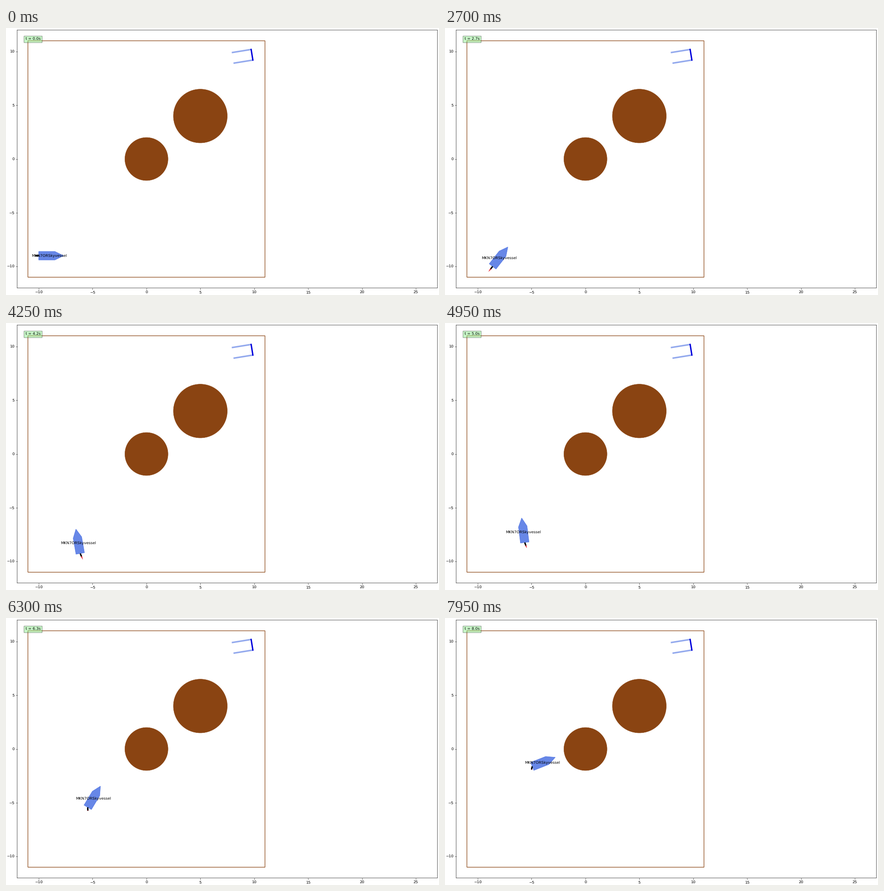
Write a matplotlib script that moves like this. It is 952 px wide and 588 px high and loops after 8 s.

```python
import numpy as np
import matplotlib.pyplot as plt
from matplotlib.animation import FuncAnimation
from matplotlib.patches import Circle, Polygon, Rectangle

W, H, DPI = 952, 588, 60
FRAMES, STEP = 160, 50
LABEL = "MKN7ORSkyvessel"
BROWN = "#8a4412"

# Flight plan: time, x, y, heading, nozzle angle (degrees)
PLAN = np.array([
    [0.00, -9.00, -9.00, 0, 0],
    [1.55, -8.80, -9.06, 9, -36],
    [2.70, -8.00, -9.21, 52, 0],
    [4.25, -6.32, -8.27, 100, 13],
    [5.70, -5.29, -5.83, 79, 20],
    [6.85, -4.62, -3.41, 42, 46],
    [7.95, -4.01, -1.25, 21.5, 56],
])


def spline(t, p):
    """Cubic spline through p(t): starts at rest, ends without acceleration."""
    h = np.diff(t)
    slope = np.diff(p, axis=0) / h[:, None]
    n = len(t)
    system, rhs = np.eye(n), np.zeros_like(p)
    for k in range(1, n - 1):
        system[k, k - 1:k + 2] = h[k], 2 * (h[k - 1] + h[k]), h[k - 1]
        rhs[k] = 3 * (h[k] * slope[k - 1] + h[k - 1] * slope[k])
    system[-1, -2:] = 1, 2
    rhs[-1] = 3 * slope[-1]
    rate = np.linalg.solve(system, rhs)

    def at(u):
        k = min(np.searchsorted(t, u, side="right") - 1, n - 2)
        s = (u - t[k]) / h[k]
        blend = s * s * (3 - 2 * s)
        bend = rate[k] * (1 - s) - rate[k + 1] * s
        return p[k] + (p[k + 1] - p[k]) * blend + h[k] * s * (1 - s) * bend

    return at


def place(points, angle, origin):
    a = np.radians(angle)
    c, s = np.cos(a), np.sin(a)
    return np.asarray(points) @ np.array([[c, s], [-s, c]]) + origin


def flame_length(t):
    """One long burn around 3.2 s, then a faint pilot flame."""
    return 0.33 * np.exp(-((t - 3.2) / 2.3) ** 4) + 0.006 * t


plt.rcParams.update({
    "font.family": "DejaVu Sans", "font.size": 10,
    "text.hinting": "none", "path.snap": False,
})
fig = plt.figure(figsize=(W / DPI, H / DPI), dpi=DPI, facecolor="white")
ax = fig.add_axes([24.5 / W, 15.5 / H, 924 / W, 568 / H])
ax.set_xlim(-12, 27)
ax.set_ylim(-12, 12)
ax.set_xticks(range(-10, 26, 5))
ax.set_yticks(range(-10, 11, 5))

ax.add_patch(Rectangle((-11, -11), 22, 22, fill=False, ec=BROWN, lw=1.5))
for center, radius in [((0, 0), 2), ((5, 4), 2.5)]:
    ax.add_patch(Circle(center, radius, fc=BROWN, ec=BROWN, lw=0.8))

# Docking bay: two arms and a back wall
dock = place([[-1.82, 0.5], [0, 0.5], [0, -0.5], [-1.82, -0.5]],
             9.2, (9.795, 9.70))
for arm in (dock[:2], dock[2:]):
    ax.plot(*arm.T, color="royalblue", alpha=0.57, lw=4,
            solid_capstyle="butt")
ax.plot(*dock[1:3].T, color="#0000dc", lw=3.6, solid_capstyle="projecting")

HULL = [[-1, -0.4], [-1, 0.4], [0.5, 0.4], [1.3, 0], [0.5, -0.4]]
TUBE, HALF = 0.3, 0.065

hull = ax.add_patch(Polygon(HULL, fc="royalblue", ec="royalblue",
                            alpha=0.8, lw=1, zorder=3))
nozzle = ax.add_patch(Polygon(HULL, fc="black", ec="none", zorder=4))
flame = ax.add_patch(Polygon(HULL, fc="#e8202a", ec="none", zorder=4))
name = ax.text(0, 0, LABEL, ha="center", va="center", zorder=5)
clock = ax.text(0.02, 0.96, "", transform=ax.transAxes, zorder=6,
                bbox=dict(facecolor="lightgreen", alpha=0.5))
flight = spline(PLAN[:, 0], PLAN[:, 1:])


def update(i):
    t = i * STEP / 1000
    x, y, heading, tilt = flight(t)
    hull.set_xy(place(HULL, heading, (x, y)))

    rear = place([-1, 0], heading, (x, y))
    tip = TUBE + flame_length(t)
    base = [[-TUBE, -HALF], [-TUBE, HALF]]
    nozzle.set_xy(place([[0, HALF], [0, -HALF], *base], heading + tilt, rear))
    flame.set_xy(place([*base, [-tip, 0]], heading + tilt, rear))

    name.set_position((x, y))
    clock.set_text(f"t = {t:.1f}s")
    return hull, nozzle, flame, name, clock


anim = FuncAnimation(fig, update, frames=FRAMES, interval=STEP,
                     init_func=lambda: update(0), repeat=True, repeat_delay=0)
plt.show()
```
